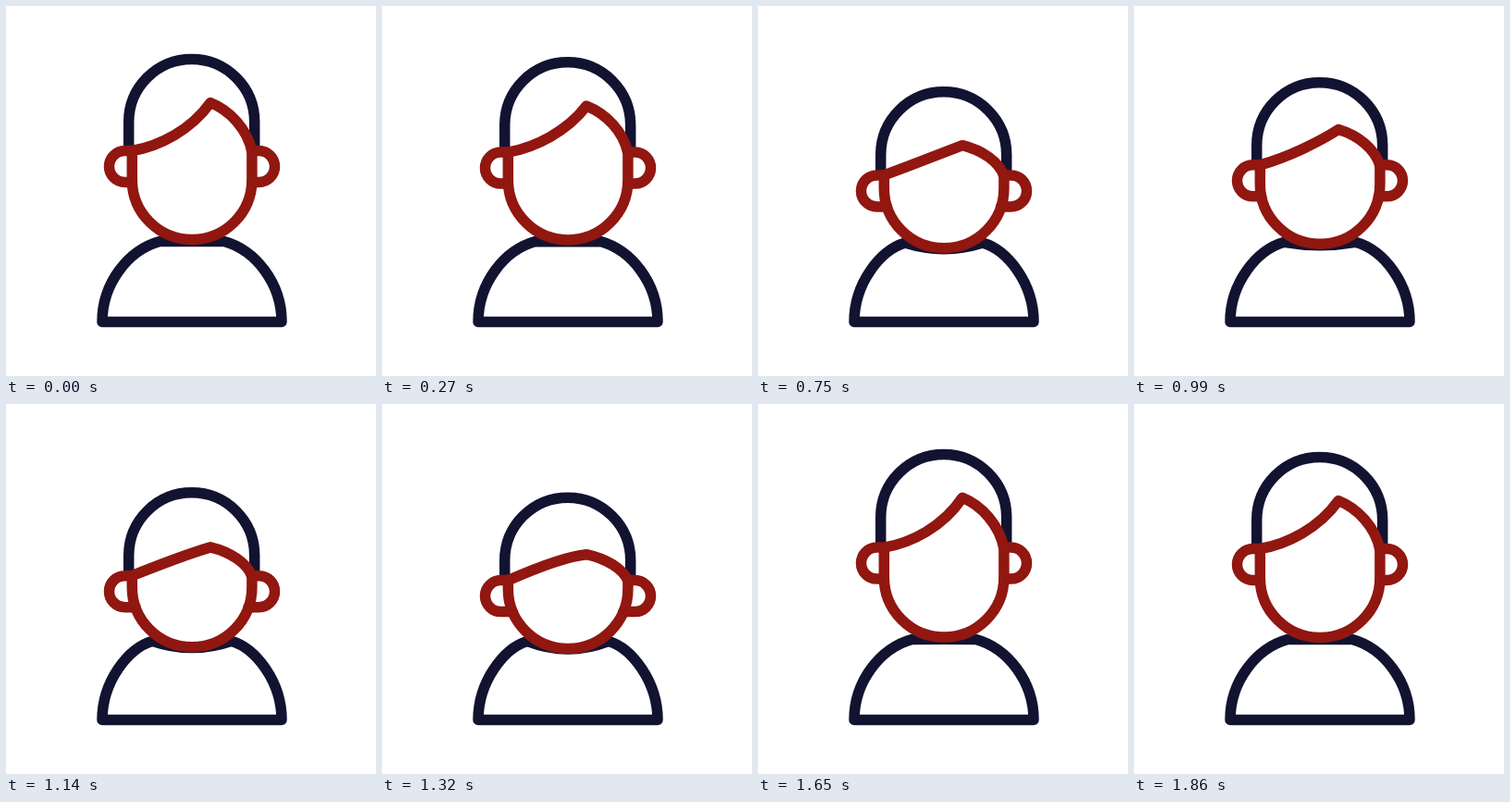
Write an HTML page that moves like this. It is 400 by 400 pixels and loops after 4070 ms.

```html
<!DOCTYPE html>
<html lang="en">
<head>
<meta charset="utf-8">
<title>Nodding person</title>
<style>
  html, body { margin: 0; width: 100%; height: 100%; overflow: hidden; background: #fff; }
  svg { display: block; width: 100%; height: 100%; }
  path { fill: none; stroke: #121331; stroke-width: 11.5; stroke-linecap: round; stroke-linejoin: round; }
  .skin { stroke: #911710; }
  #hair { stroke-linecap: butt; }
</style>
</head>
<body>
<svg viewBox="0 0 400 400">
  <path id="body"/>
  <path id="hair"/>
  <path id="ears" class="skin"/>
  <path id="face" class="skin"/>
</svg>
<script>
const LOOP = 4070, STEP = 30, MOVE_END = 1860;
const CENTER = 201, EAR_R = 17;
const SOFT = [.37, .63], SNAPPY = [.4, .4];

// Nod keys: time, ear drop in px, easing used to reach the key
const nod = [
  [0, 0, SOFT],
  [180, -1.6, SOFT],
  [630, 32, SOFT],
  [945, 14.3, SOFT],
  [1260, 36, SOFT],
  [1680, -1.6, SNAPPY],
  [MOVE_END, 0, SOFT]
];

// Poses along the nod: ear drop, hair drop, parting drop, chin drop, parting curl
const poses = [
  [0, 0, 0, 0, 29.5],
  [7.5, 16, 17, 2, 20],
  [16, 26, 30, 5, 13],
  [20, 28, 37, 6.5, 10],
  [27, 36, 47, 9.5, 8],
  [34, 43.5, 58, 12, 2]
];

const mix = (a, b, u) => a + (b - a) * u;

// Cubic Bezier easing with flat ends
function ease(u, [x1, x2]) {
  let lo = 0, hi = 1, s = .5;
  for (let i = 0; i < 20; i++) {
    s = (lo + hi) / 2;
    const r = 1 - s;
    const x = 3 * r * r * s * x1 + 3 * r * s * s * x2 + s * s * s;
    if (x < u) lo = s; else hi = s;
  }
  return s * s * (3 - 2 * s);
}

function dropAt(t) {
  if (t >= MOVE_END) return 0;
  const i = nod.findIndex(key => key[0] > t);
  const [t0, a] = nod[i - 1], [t1, b, curve] = nod[i];
  return mix(a, b, ease((t - t0) / (t1 - t0), curve));
}

function poseAt(drop) {
  let i = poses.findIndex(p => p[0] > drop);
  if (i < 0) i = poses.length - 1;
  i = Math.max(i, 1);
  const a = poses[i - 1], b = poses[i];
  const u = (drop - a[0]) / (b[0] - a[0]);
  return a.map((v, k) => mix(v, b[k], u));
}

const setPath = (id, d) => document.getElementById(id).setAttribute('d', d);

function draw(t) {
  const [earDrop, hairDrop, tipDrop, chinDrop, curl] = poseAt(dropAt(t));
  const ear = 173.5 + earDrop;
  const top = ear - EAR_R, bottom = ear + EAR_R;
  const crown = 125.5 + hairDrop;
  const tip = 104.5 + tipDrop;
  const jaw = 187.7 + chinDrop;

  // The collar gives way under the chin
  const k = chinDrop / 12;
  const neckX = 166 - 9 * k, neckY = 254.5 + 2 * k;
  const collar = 2 * (254.5 + chinDrop * .88) - neckY;
  setPath('body', `M104 341.5C104 300 132 264 ${neckX} ${neckY}
    Q${CENTER} ${collar} ${2 * CENTER - neckX} ${neckY}
    C270 264 298 300 298 341.5Z`);

  setPath('hair', `M132.7 ${top}V${crown}A68 68 0 0 1 268.7 ${crown}V${top + 2}`);

  const below = Math.max(0, bottom - jaw);
  const edge = Math.sqrt(64.8 ** 2 - below ** 2);
  setPath('ears', `M136.3 ${top}H128.5a${EAR_R} ${EAR_R} 0 0 0 0 ${2 * EAR_R}H${CENTER - edge}
    M265.8 ${top}H273.5a${EAR_R} ${EAR_R} 0 0 1 0 ${2 * EAR_R}H${CENTER + edge}`);

  const rise = top - tip;
  setPath('face', `M136.3 ${top}C166 ${top - 5 - 8 * k} 200 ${tip + curl} 221 ${tip}
    C242 ${tip + rise * .16} 261 ${tip + rise * .55} 265.9 ${top + 1}
    V${jaw}A64.8 64.8 0 0 1 136.3 ${jaw}Z`);
}

const start = performance.now();
function frame() {
  const t = (performance.now() - start) % LOOP;
  draw(Math.floor(t / STEP) * STEP);
  requestAnimationFrame(frame);
}
frame();
</script>
</body>
</html>
```
